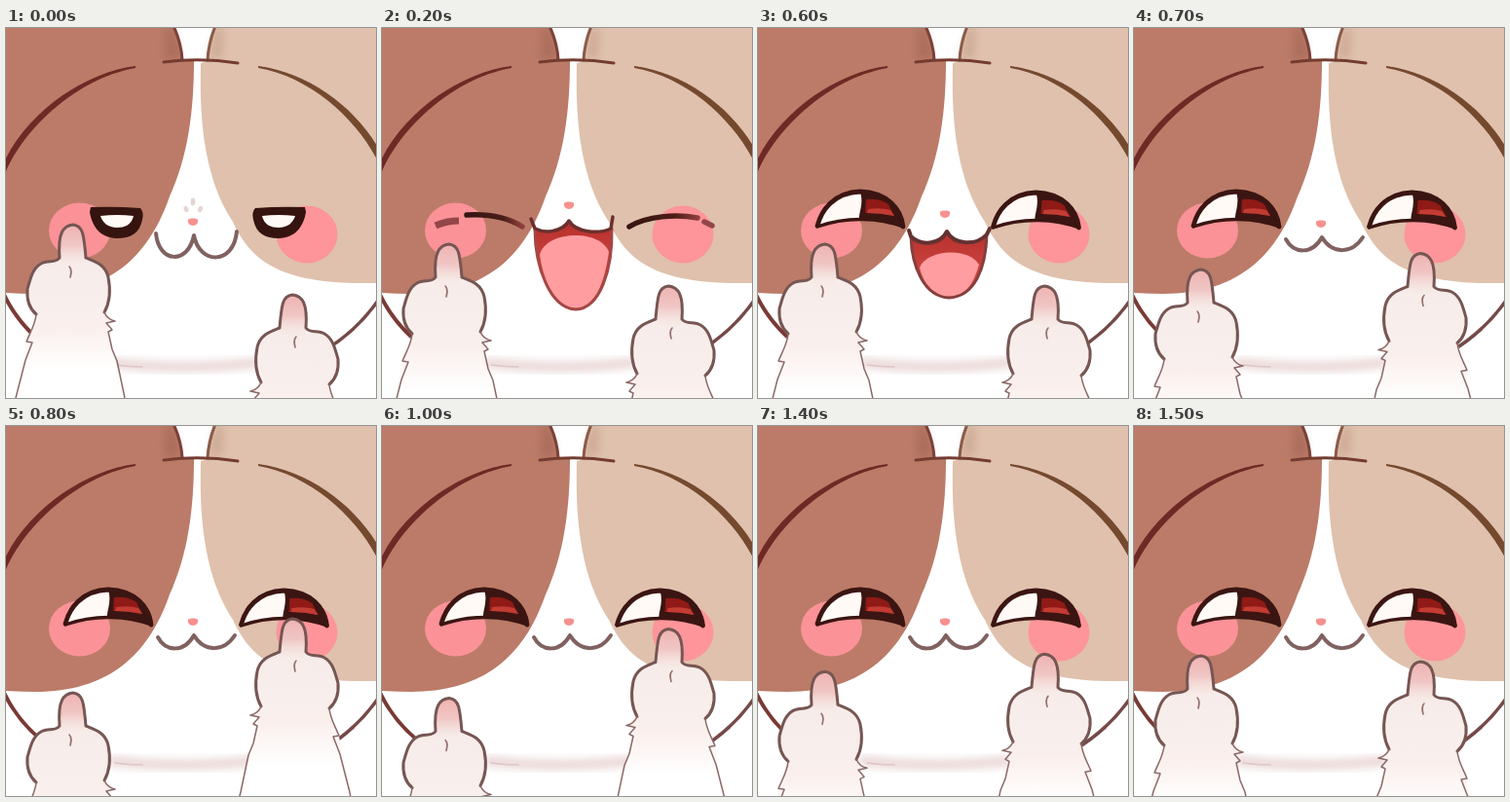
These frames come from a looping animation (380x380 px, 1600 ms). An HTML page:

```html
<!DOCTYPE html>
<html lang="en">
<head>
<meta charset="utf-8">
<title>Cheeky cat</title>
<style>
  html, body { margin: 0; width: 100%; height: 100%; overflow: hidden; background: #fff; }
  svg { display: block; width: 100vw; height: 100vh; }
  path { stroke-linecap: round; stroke-linejoin: round; }
  .line { fill: none; stroke-width: 3; }
  .lip { fill: none; stroke: #806260; stroke-width: 4; }
</style>
</head>
<body>
<svg viewBox="0 0 380 380">
  <defs>
    <linearGradient id="fur" gradientUnits="userSpaceOnUse" x1="0" y1="30" x2="0" y2="150">
      <stop offset="0" stop-color="#f6ebe8"/><stop offset=".45" stop-color="#f8efec"/>
      <stop offset=".62" stop-color="#faefec"/><stop offset="1" stop-color="#fff"/>
    </linearGradient>
    <linearGradient id="tip" gradientUnits="userSpaceOnUse" x1="0" y1="0" x2="0" y2="42">
      <stop offset="0" stop-color="#eeb3b2"/><stop offset=".5" stop-color="#f0c6c4"/>
      <stop offset="1" stop-color="#f5e2df" stop-opacity="0"/>
    </linearGradient>
    <linearGradient id="lid">
      <stop offset="0" stop-color="#351512"/><stop offset=".65" stop-color="#4a1d19"/><stop offset="1" stop-color="#8f3f3c"/>
    </linearGradient>
    <linearGradient id="throat" x2="0" y2="1">
      <stop offset="0" stop-color="#b92f2b"/><stop offset="1" stop-color="#d65450"/>
    </linearGradient>
    <filter id="soft" x="-50%" y="-200%" width="200%" height="500%"><feGaussianBlur stdDeviation="4"/></filter>

    <g id="paw">
      <path fill="url(#fur)" d="M-13 34C-16 7-8 1 1 0C11 1 14 10 14 34C24 38 34 41 37 54C40 69 38 81 33 90L44 99L36 101L40 124L44 138L58 190H-62L-47 121L-41 121L-46 120C-43 110-40 101-37 92C-44 86-47 78-46 66C-43 56-41 45-32 40C-25 36-17 40-13 34Z"/>
      <path fill="url(#tip)" d="M-13 34C-16 7-8 1 1 0C11 1 14 10 14 34L8 44H-9Z"/>
      <path class="line" stroke="#765653" stroke-width="2.6" d="M14 34C12 10 11 1 1 0C-9 1-15 8-13 34C-17 40-25 36-32 40C-41 45-43 56-46 66C-47 78-44 86-37 92M14 34C24 38 34 41 37 54C40 69 38 81 33 90"/>
      <path class="line" stroke="#8a6968" style="stroke-width:1.5" d="M-37 92C-38 103-43 110-47 120L-41 121L-48 139L-58 178L-60 190M33 90C35 95 39 98 44 99L35 101L41 108L37 110L41 128L46 140L54 178L57 190"/>
      <path class="line" stroke="#93706d" style="stroke-width:1.6" d="M-3 43C0 46-1 50-2 54"/>
    </g>

    <g id="openEye">
      <path fill="#fffaf6" d="M61 204C65 188 77 169 105 168C133 169 147 186 149 204C125 195 92 193 61 204Z"/>
      <path fill="#3b1512" d="M105 168C133 169 147 186 149 204Q127 196 104 197C103 190 109 181 105 168Z"/>
      <path fill="#8f1a16" d="M111 176Q126 175 134 181L140 193Q126 190 110 190Z"/>
      <path fill="#c23c33" d="M113 186Q126 184 136 187L140 193Q126 190 112 190Z"/>
      <path fill="none" stroke="#3b1512" stroke-width="3.4" d="M61 204C92 193 125 195 149 204"/>
      <path fill="none" stroke="#3b1512" stroke-width="4.8" d="M61 203C65 188 77 169 105 168C133 169 147 186 149 204"/>
    </g>
    <g id="halfEye">
      <path fill="#35130f" d="M87 184Q113 183 138 185Q142 189 140 197C137 211 128 216 114 216C96 216 88 202 86 189Z"/>
      <path fill="#fffaf6" d="M97 193Q114 191 131 193C129 202 122 205 114 205C105 205 99 200 97 193Z"/>
    </g>
    <g id="dots" fill="#e4d5d3">
      <ellipse cx="192" cy="178.5" rx="2.4" ry="4"/>
      <ellipse cx="185" cy="186" rx="2.3" ry="3.2" transform="rotate(-25 185 186)"/>
      <ellipse cx="199.5" cy="186" rx="2.3" ry="3.2" transform="rotate(25 199.5 186)"/>
    </g>
    <path id="nose" fill="#f6918f" d="M187 -2C188 -4 196 -4 197 -2C198 1 195 4 192 4C189 4 186 1 187 -2Z"/>
  </defs>

  <!-- ears and coat -->
  <path fill="#bb7b68" d="M0 0H172Q179 15 181 34H193C193 85 187 132 168 173C149 228 112 273 30 273Q14 273 0 272Z"/>
  <path fill="#dfc1ad" d="M380 0H215Q208 15 207 34L200 36C199 80 200 150 233 199C252 240 282 264 380 262Z"/>
  <path fill="#8e5145" opacity=".35" filter="url(#soft)" d="M165 0H172L179 30L163 32Z"/>
  <path fill="#a5765f" opacity=".3" filter="url(#soft)" d="M215 0H223L222 30L209 30Z"/>
  <path class="line" stroke="#7a4038" d="M172 -2Q180 15 181 33"/>
  <path class="line" stroke="#8a5a48" d="M215 -2Q208 15 207 33"/>
  <path class="line" stroke="#743c30" d="M162 35Q200 30 238 36"/>
  <path fill="#6f2925" d="M133 39C78 46 16 90 -6 147L-2 152C20 97 80 50 133 41Z"/>
  <path fill="#75492e" d="M259 39C314 46 364 86 386 130L382 137C360 93 312 50 259 41Z"/>
  <path class="line" stroke="#7a3a35" style="stroke-width:4" d="M-2 274C10 299 28 318 50 333"/>
  <path class="line" stroke="#744a48" style="stroke-width:3.6" d="M384 277C370 298 349 318 326 332"/>
  <path class="line" stroke="#dcb9b9" style="stroke-width:10" opacity=".6" filter="url(#soft)" d="M108 344Q180 352 256 344"/>
  <path class="line" stroke="#c59b9b" style="stroke-width:1.5" opacity=".4" d="M112 346Q125 348 140 348"/>
  <g fill="#fe949a">
    <ellipse cx="75.5" cy="208" rx="31.5" ry="28.5" opacity=".95"/>
    <ellipse cx="309" cy="212" rx="31.5" ry="29.5" opacity=".97"/>
  </g>

  <!-- eyes -->
  <g data-eyes="half">
    <use href="#halfEye"/>
    <use href="#halfEye" transform="translate(394) scale(-1 1)"/>
  </g>
  <g data-eyes="shut" fill="none" stroke-width="5.5">
    <path stroke="url(#lid)" d="M87 192Q122 190 144 204"/>
    <path stroke="#934649" stroke-width="7" style="stroke-linecap:butt" d="M55 203Q66 198 79 198"/>
    <path stroke="url(#lid)" d="M254 204C272 193 302 191 324 195"/>
    <path stroke="#934649" d="M331 199L339 203"/>
  </g>
  <g data-eyes="open">
    <use href="#openEye"/>
    <use href="#openEye" x="180.5" y="1"/>
  </g>

  <!-- mouths -->
  <g data-mouth="w">
    <use href="#dots"/><use href="#nose" y="199"/>
    <path class="lip" d="M154 211C157 242 187 243 193 213C199 244 234 243 237 209"/>
  </g>
  <g data-mouth="flat">
    <use href="#nose" y="201"/>
    <path class="lip" d="M156 217C164 232 183 233 193 215C204 233 224 232 235 215"/>
  </g>
  <g data-mouth="mid">
    <use href="#nose" y="191"/>
    <path fill="url(#throat)" d="M157 214C167 224 187 223 194 209C201 223 224 224 235 212C234 246 223 276 196 277C171 276 158 246 157 214Z"/>
    <path fill="#ff9da0" d="M166 246C174 227 216 225 227 243C221 264 212 276 196 276C182 275 170 264 166 246Z"/>
    <path class="lip" style="stroke:#853f3d;stroke-width:3" d="M157 214C158 246 171 276 196 277C223 276 234 246 235 212"/>
    <path class="lip" style="stroke:#633231" d="M155 208L157 214C167 224 187 223 194 209C201 223 224 224 235 212L238 206"/>
  </g>
  <g data-mouth="big">
    <use href="#nose" y="182"/>
    <path fill="url(#throat)" d="M157 206C167 211 185 210 192 198C199 210 222 212 236 206C237 248 224 288 199 289C173 288 157 246 157 206Z"/>
    <path fill="#ff9da0" d="M162 233C168 208 224 206 233 230C228 264 218 288 199 288C178 286 166 262 162 233Z"/>
    <path class="lip" style="stroke:#a34845;stroke-width:3" d="M157 206C157 246 173 288 199 289C224 288 237 248 236 206"/>
    <path class="lip" style="stroke:#6b2f2d;stroke-width:3.5" d="M153 196L157 206C167 211 185 210 192 198C199 210 222 212 235 206L237 194"/>
  </g>

  <use id="leftPaw" href="#paw"/>
  <use id="rightPaw" href="#paw"/>
</svg>
<script>
  const STEP = 100, STEPS = 16;
  const mouths = 'w mid big mid w flat mid flat flat w flat flat w w flat flat'.split(' ');
  const eyesAt = step => step === 0 ? 'half' : step < 4 ? 'shut' : 'open';

  // [step, left fingertip y, right fingertip y]
  const poses = [[0, 202, 274], [2, 222, 265], [6, 222, 265], [8, 274, 198],
                 [12, 285, 219], [15, 236, 242], [16, 202, 274]];

  const leftPaw = document.getElementById('leftPaw');
  const rightPaw = document.getElementById('rightPaw');

  function pawHeights(step) {
    const i = poses.findIndex(pose => pose[0] > step);
    const a = poses[i - 1], b = poses[i];
    const k = (step - a[0]) / (b[0] - a[0]);
    return [1, 2].map(side => a[side] + (b[side] - a[side]) * k);
  }

  function show(kind, name) {
    for (const el of document.querySelectorAll(`[data-${kind}]`))
      el.style.display = el.dataset[kind] === name ? '' : 'none';
  }

  function draw(step) {
    const [left, right] = pawHeights(step);
    leftPaw.setAttribute('transform', `translate(68 ${left})`);
    rightPaw.setAttribute('transform', `translate(295 ${right}) scale(-1 1)`);
    show('eyes', eyesAt(step));
    show('mouth', mouths[step]);
  }

  const start = performance.now();
  function tick() {
    draw(Math.floor((performance.now() - start) / STEP) % STEPS);
    requestAnimationFrame(tick);
  }
  tick();
</script>
</body>
</html>
```
